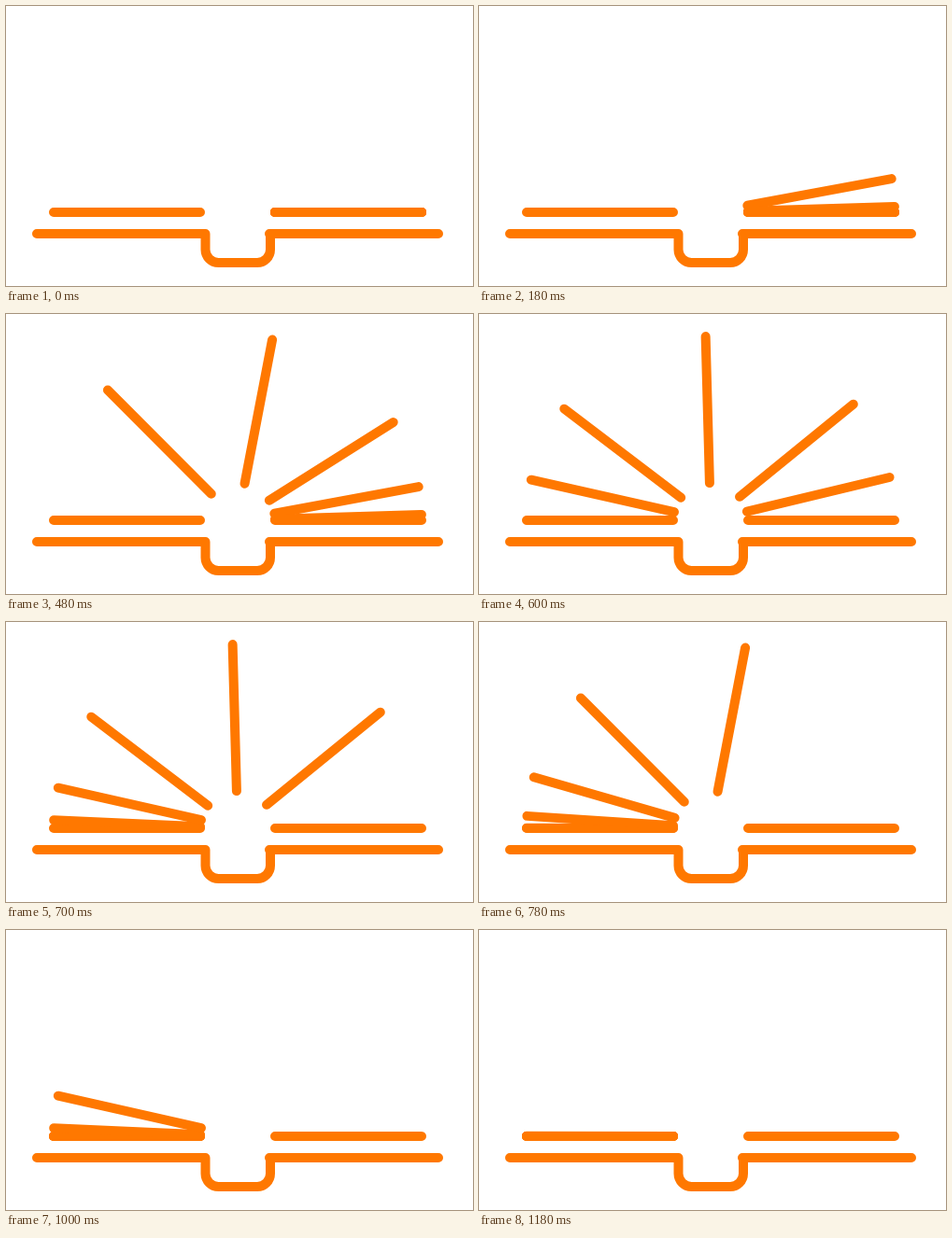
Recreate the animation shown at these times as an HTML page. Size 500x300 px, loop 1.2 s.

```html
<!DOCTYPE html>
<html lang="en">
<head>
<meta charset="utf-8">
<title>Book loader</title>
<style>
  html, body { margin: 0; height: 100%; overflow: hidden; background: #fff; }
  svg { display: block; width: 100vw; height: 100vh; }
</style>
</head>
<body>
<svg viewBox="0 0 500 300" fill="none" stroke="#ff7800" stroke-width="10" stroke-linecap="round" stroke-linejoin="round">
  <path d="M33 244H213.5V261A14 14 0 0 0 227.5 275H269A14 14 0 0 0 283 261V244M282 244H463"/>
  <path d="M51 221H208M288 221H445"/>
  <g id="pages"></g>
</svg>
<script>
const LOOP = 1200, FLIP = 800, STAGGER = 100, PAGES = 5;
const LEAD = 1.5;   // ms
const EASE = 0.64;  // cubic-bezier(EASE, 0, 1 - EASE, 1)

const group = document.getElementById('pages');
const pages = Array.from({ length: PAGES }, () => {
  const page = document.createElementNS('http://www.w3.org/2000/svg', 'path');
  page.setAttribute('d', 'M288 221H445');
  return group.appendChild(page);
});

function ease(x) {
  if (x <= 0) return 0;
  if (x >= 1) return 1;
  let low = 0, high = 1, s;
  for (let i = 0; i < 24; i++) {
    s = (low + high) / 2;
    const r = 1 - s;
    const bx = 3 * EASE * s * r * r + 3 * (1 - EASE) * s * s * r + s ** 3;
    if (bx < x) low = s; else high = s;
  }
  return s * s * (3 - 2 * s);
}

function draw(now) {
  const t = now % LOOP + LEAD;
  pages.forEach((page, i) => {
    const angle = -180 * ease((t - i * STAGGER) / FLIP);
    page.setAttribute('transform', `rotate(${angle} 248 221)`);
  });
  requestAnimationFrame(draw);
}

const start = performance.now();
const tick = () => draw(performance.now() - start);
draw = (paint => () => paint(performance.now() - start))(draw);
tick();
</script>
</body>
</html>
```
